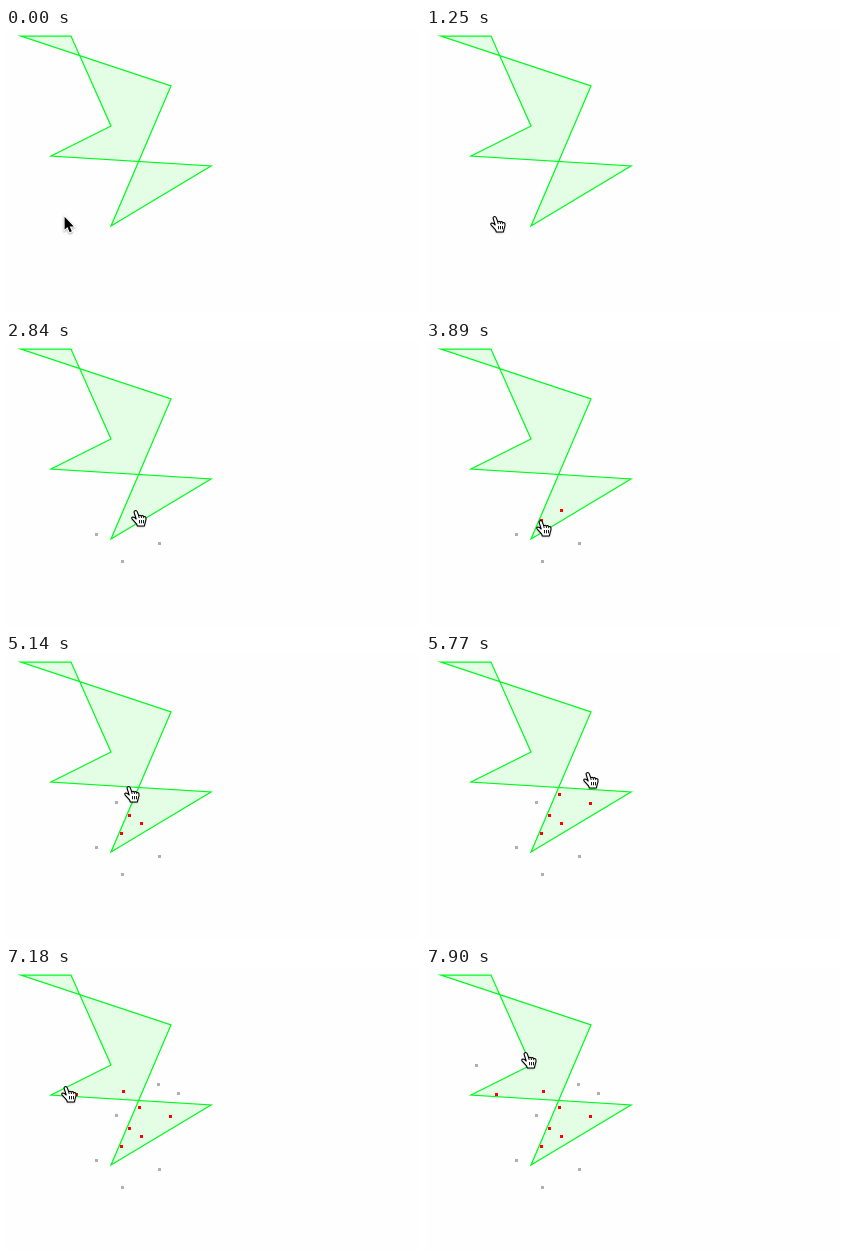
These frames come from a looping animation (414 px wide and 285 px high, 7990 ms). An HTML page with a canvas:

```html
<!DOCTYPE html>
<html lang="en">
<head>
<meta charset="utf-8">
<title>Points in a polygon</title>
<style>
  html, body { margin: 0; width: 100%; height: 100%; overflow: hidden; background: #fefefe; }
  canvas { display: block; }
</style>
</head>
<body>
<canvas id="stage" width="414" height="285"></canvas>
<script>
const ctx = document.getElementById('stage').getContext('2d');
const LOOP = 7990;
const STEPS = 90;
const HAND_FROM = 7;
const HOTSPOT = { x: 15, y: 8 };

const polygon = new Path2D('M15 8H65L105 98L45 128L205 138L105 198L165 58Z');
const arrow = new Path2D('M0 0V13L2.9 10.3L5 15.4L7.2 14.5L5.1 9.6H9.2Z');
const hand = new Path2D('M3 1.8Q3.4 .5 4.7 .5Q5.8 .6 6.3 1.9L7.7 5.8Q9.2 4.6 10.2 6' +
  'Q11.8 5.1 12.7 6.5Q15.2 6 15 9.2Q14.9 10.6 14.2 12.4L13.4 16H6.4L5.5 13.8' +
  'Q3.4 11.4 1 8.8Q.2 7.2 1.9 7Q3.3 7 5.2 9Z');
const fingers = new Path2D('M7.7 5.8L8.2 8M10.2 6L10.5 8M12.7 6.5V8.2' +
  'M8.5 10V13.3M10.5 10V13.3M12.5 10V13.3');

// The hand rests briefly before each click and passes through each move.
const click = (step, x, y) => ({
  x, y, arrive: step - 2, leave: step,
  color: ctx.isPointInPath(polygon, x, y) ? '#f00' : '#b0b0b0'
});
const move = (step, x, y) => ({ x, y, arrive: step, leave: step });

const stops = [
  move(11, 72, 198),
  click(20, 90, 193), click(26, 116, 220), click(30, 153, 202),
  click(35, 135, 169), click(40, 115, 179), move(44, 125, 187),
  click(48, 123, 161), click(53, 110, 148), click(59, 133, 140),
  click(62, 164, 149), click(66, 172, 126), click(72, 152, 117),
  click(77, 117, 124), click(81, 70, 127), click(85, 50, 98),
  move(89, 110, 93)
];

const ease = k => (1 - Math.cos(Math.PI * k)) / 2;

function pointerAt(step) {
  const next = stops.findIndex(stop => stop.leave >= step);
  const to = stops[next];
  const from = stops[next - 1];
  if (!from || step >= to.arrive) return to;
  const k = ease((step - from.leave) / (to.arrive - from.leave));
  return { x: from.x + (to.x - from.x) * k, y: from.y + (to.y - from.y) * k };
}

function drawPolygon() {
  ctx.fillStyle = '#e3fee4';
  ctx.fill(polygon);
  ctx.lineWidth = 1.25;
  ctx.strokeStyle = '#00fb1e';
  ctx.stroke(polygon);
}

function drawDots(step) {
  for (const { color, leave, x, y } of stops) {
    if (!color || step < leave) continue;
    ctx.fillStyle = color;
    ctx.fillRect(x - 1, y - 1, 3, 3);
  }
}

function castShadow() {
  ctx.shadowColor = 'rgba(0,0,0,.35)';
  ctx.shadowBlur = 2;
  ctx.shadowOffsetY = 1;
}

function at(x, y, paint) {
  ctx.save();
  ctx.translate(x, y);
  paint();
  ctx.restore();
}

function paintArrow() {
  ctx.lineWidth = 2;
  ctx.strokeStyle = '#fff';
  ctx.save();
  castShadow();
  ctx.stroke(arrow);
  ctx.restore();
  ctx.fillStyle = '#000';
  ctx.fill(arrow);
}

function paintHand() {
  ctx.fillStyle = '#fff';
  ctx.save();
  castShadow();
  ctx.fill(hand);
  ctx.restore();
  ctx.strokeStyle = '#000';
  ctx.lineJoin = 'round';
  ctx.lineWidth = 1.1;
  ctx.stroke(hand);
  ctx.lineWidth = 0.9;
  ctx.stroke(fingers);
}

function draw(time) {
  const step = Math.min(STEPS - 1, Math.floor((time % LOOP + 25) / LOOP * STEPS));
  ctx.fillStyle = '#fefefe';
  ctx.fillRect(0, 0, 414, 285);
  drawPolygon();
  drawDots(step);
  if (step < HAND_FROM) {
    at(58.6, 188.8, paintArrow);
  } else {
    const { x, y } = pointerAt(step);
    at(Math.round(x - HOTSPOT.x), Math.round(y - HOTSPOT.y), paintHand);
  }
}

const start = performance.now();
function tick() {
  draw(performance.now() - start);
  requestAnimationFrame(tick);
}
tick();
</script>
</body>
</html>
```
